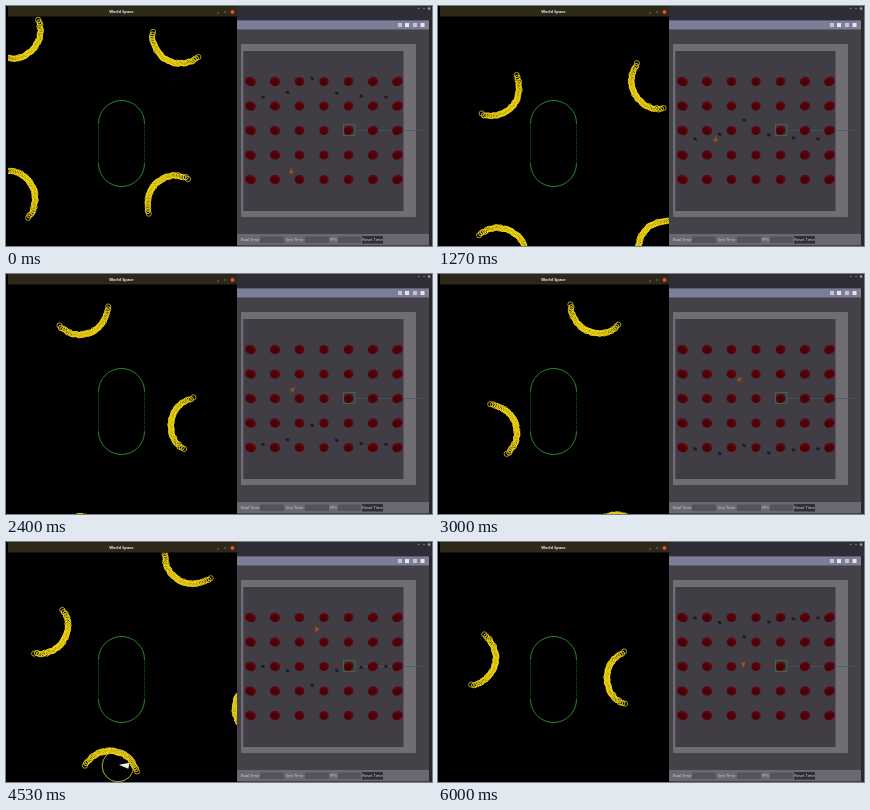
Write an HTML page with a canvas that moves like this. It is 426 by 240 pixels and loops after 6.07 s.

```html
<!DOCTYPE html>
<html>
<head>
<meta charset="utf-8">
<style>
  html, body { margin: 0; width: 100%; height: 100%; overflow: hidden; background: #000; }
  canvas { display: block; width: 426px; height: 240px; }
</style>
</head>
<body>
<canvas id="stage" width="426" height="240"></canvas>
<script>
const ctx = document.getElementById('stage').getContext('2d');
const LOOP = 6070, STEP = 200 / 3, TAU = Math.PI * 2;
const PITCH = 24.5, SCALE = 6.87, TREE = 28;
const VIEW = { x: 115, y: 137 };
// Robot pose on the map: time, x, y, view rotation in degrees
const POSES = [
  [0, 285.3, 164.9, 1.7],
  [730, 280.1, 141.9, -2.6],
  [1800, 277.5, 125.5, -7.5],
  [2400, 287, 115, -45],
  [3000, 302, 105, -49.2],
  [3670, 310.9, 89.6, 21.8],
  [4530, 310.5, 88, 155.2],
  [6000, 305.3, 122.9, 187],
  [6070, 305, 124.5, 188]
];
const LAGS = [0, .14, .57, .12, .03, 0];
const trees = [];
for (let row = 0; row < 5; row++)
  for (let col = 0; col < 7; col++)
    trees.push({ x: 244.5 + col * PITCH, y: 75.5 + row * PITCH, col });

function rect(x, y, w, h, color) {
  ctx.fillStyle = color;
  ctx.fillRect(x, y, w, h);
}

function disc(x, y, rx, ry, color, tilt = 0) {
  ctx.fillStyle = color;
  ctx.beginPath();
  ctx.ellipse(x, y, rx, ry, tilt, 0, TAU);
  ctx.fill();
}

function ring(x, y, r, color, width = 1) {
  ctx.strokeStyle = color;
  ctx.lineWidth = width;
  ctx.beginPath();
  ctx.arc(x, y, r, 0, TAU);
  ctx.stroke();
}

function line(x1, y1, x2, y2, color, width = 1) {
  ctx.strokeStyle = color;
  ctx.lineWidth = width;
  ctx.beginPath();
  ctx.moveTo(x1, y1);
  ctx.lineTo(x2, y2);
  ctx.stroke();
}

function triangle(x, y, turn, points, color) {
  ctx.save();
  ctx.translate(x, y);
  ctx.rotate(turn);
  ctx.fillStyle = color;
  ctx.beginPath();
  points.forEach(([px, py]) => ctx.lineTo(px, py));
  ctx.fill();
  ctx.restore();
}

function label(text, x, y, color, align = 'left', weight = 400) {
  ctx.font = `${weight} 4px "Open Sans", sans-serif`;
  ctx.textAlign = align;
  ctx.textBaseline = 'middle';
  ctx.fillStyle = color;
  ctx.fillText(text, x, y);
}

function slope(i, k) {
  const a = POSES[Math.max(0, i - 1)], b = POSES[Math.min(POSES.length - 1, i + 1)];
  return (b[k] - a[k]) / (b[0] - a[0]);
}

// Cubic Hermite through the poses
function poseAt(ms) {
  let i = 0;
  while (i < POSES.length - 2 && ms >= POSES[i + 1][0]) i++;
  const a = POSES[i], b = POSES[i + 1], d = b[0] - a[0], u = (ms - a[0]) / d;
  const ease = u * u * (3 - 2 * u);
  const [x, y, turn] = [1, 2, 3].map(k =>
    a[k] + (b[k] - a[k]) * ease +
    d * u * (1 - u) * ((1 - u) * slope(i, k) - u * slope(i + 1, k)));
  return { x, y, turn: turn * Math.PI / 180 };
}

function scannedTree(x, y, seed) {
  const facing = Math.atan2(VIEW.y - y, VIEW.x - x), count = 46;
  for (let i = 0; i <= count; i++) {
    const end = i === 0 || i === count;
    const angle = facing + Math.asin((i / count * 2 - 1) * .93);
    const r = TREE + .6 * Math.sin(i * i * 5.7 + seed * 3);
    ring(x + r * Math.cos(angle), y + r * Math.sin(angle), 2.6, end ? '#c4ae30' : '#f2d714', .9);
  }
}

function capsule() {
  ctx.setLineDash([1, 1]);
  line(92.5, 117, 92.5, 158, '#125a18');
  line(138.5, 117, 138.5, 158, '#125a18');
  ctx.setLineDash([]);
  ctx.strokeStyle = '#258a2c';
  ctx.lineWidth = 1;
  ctx.beginPath();
  ctx.arc(115.5, 117.5, 23, Math.PI, TAU);
  ctx.moveTo(138.5, 157.5);
  ctx.arc(115.5, 157.5, 23, 0, Math.PI);
  ctx.stroke();
}

function marker(ms) {
  if (ms > 600 && ms < 870) disc(110, 12, 2.2, 1.8, '#dcdcdc');
  if (ms < 3300 || ms > 4950) return;
  const u = Math.max(0, Math.min(1, (ms - 3670) / 860));
  const y = 215 + 9 * u;
  ring(112, y, 15.8, '#b8a838');
  triangle(111 + 8 * u, y - 1, -.6 + .8 * u, [[-6, 1], [4, -3], [4, 3]], '#f4f0dc');
}

function scanWindow(ms, pose) {
  ctx.save();
  ctx.beginPath();
  ctx.rect(2, 10.5, 229, 229.5);
  ctx.clip();
  const c = Math.cos(pose.turn) * SCALE, s = Math.sin(pose.turn) * SCALE;
  trees.forEach((tree, i) => {
    const dx = tree.x - pose.x, dy = tree.y - pose.y;
    const x = VIEW.x + c * dx - s * dy, y = VIEW.y + s * dx + c * dy;
    if (x > -35 && x < 266 && y > -25 && y < 275) scannedTree(x, y, i);
  });
  capsule();
  marker(ms);
  ctx.restore();
  rect(2, 0, 229, 10.5, '#2d2818');
  label('World Space', 115.5, 6, '#f0f0f0', 'center', 700);
  line(211, 7, 213, 7, '#aaa', .6);
  line(218, 6, 220, 6, '#aaa', .6);
  disc(226.5, 6, 2, 2, '#e04e32');
}

function mapWindow(ms, pose) {
  rect(231, 0, 195, 240, '#444149');
  rect(231, 0, 195, 14, '#2e2c36');
  [413, 418].forEach(x => disc(x, 2.5, .7, .7, '#999'));
  disc(423, 2.5, 1.3, 1.3, '#b0a098');
  rect(231, 14.5, 192, 9, '#7c7d98');
  [394, 401, 409, 416.5].forEach((x, i) => rect(x - 2, 17, 4, 4, i % 2 ? '#e6e6e6' : '#c2c6ce'));

  rect(235, 38, 175, 173, '#706e72');
  rect(237.5, 45, 160, 160, '#403d45');
  line(325, 124.5, 337, 124.5, '#5e3440', .7);
  line(349, 124.5, 421, 124.5, '#355f66', .7);
  line(237.5, 45, 237.5, 205, '#4c4a60', .8);

  trees.forEach(({ x, y, col }) => {
    const wide = Math.abs(col - 3) * .3;
    const tilt = (col - 3) * -.12;
    disc(x, y, 4.6 + wide, 4.6, '#5f060d', tilt);
    disc(x - .5, y + .7, 3.2 + wide, 3.2, '#4a0208', tilt);
  });
  ctx.strokeStyle = '#3f7146';
  ctx.lineWidth = .8;
  ctx.strokeRect(337.5, 118.5, 11.5, 11);

  LAGS.forEach((lag, i) => {
    const y = 182.5 - 33 * Math.abs(ms / 1000 - 2.77 - lag);
    disc(257 + i * 24.6, y, 2, 1.5, '#1e1c26', .4);
  });
  triangle(pose.x, pose.y, -pose.turn, [[0, -3], [2.3, 2.5], [-2.3, 2.5]], '#a84d18');

  rect(231, 228, 192, 11, '#6a6872');
  rect(423, 14, 3, 226, '#29282c');
  [[254, 24], [299, 24], [332, 23]].forEach(([x, w]) => rect(x, 230.5, w, 6.5, '#55535a'));
  label('Real Time', 235, 234, '#d8d8d8');
  label('Sim Time', 280, 234, '#d8d8d8');
  label('FPS', 324, 234, '#d8d8d8');
  rect(356, 230, 21, 7.5, '#302f35');
  label('Reset Time', 366.5, 234, '#dedede', 'center');
}

// Frame times are rounded to 10 ms, so steps may begin slightly early
function draw(now) {
  const ms = Math.floor((now % LOOP + 5) / STEP) * STEP;
  const pose = poseAt(ms);
  rect(0, 0, 426, 240, '#000');
  scanWindow(ms, pose);
  mapWindow(ms, pose);
}

const start = performance.now();
function tick() {
  draw(performance.now() - start);
  requestAnimationFrame(tick);
}
tick();
</script>
</body>
</html>
```
